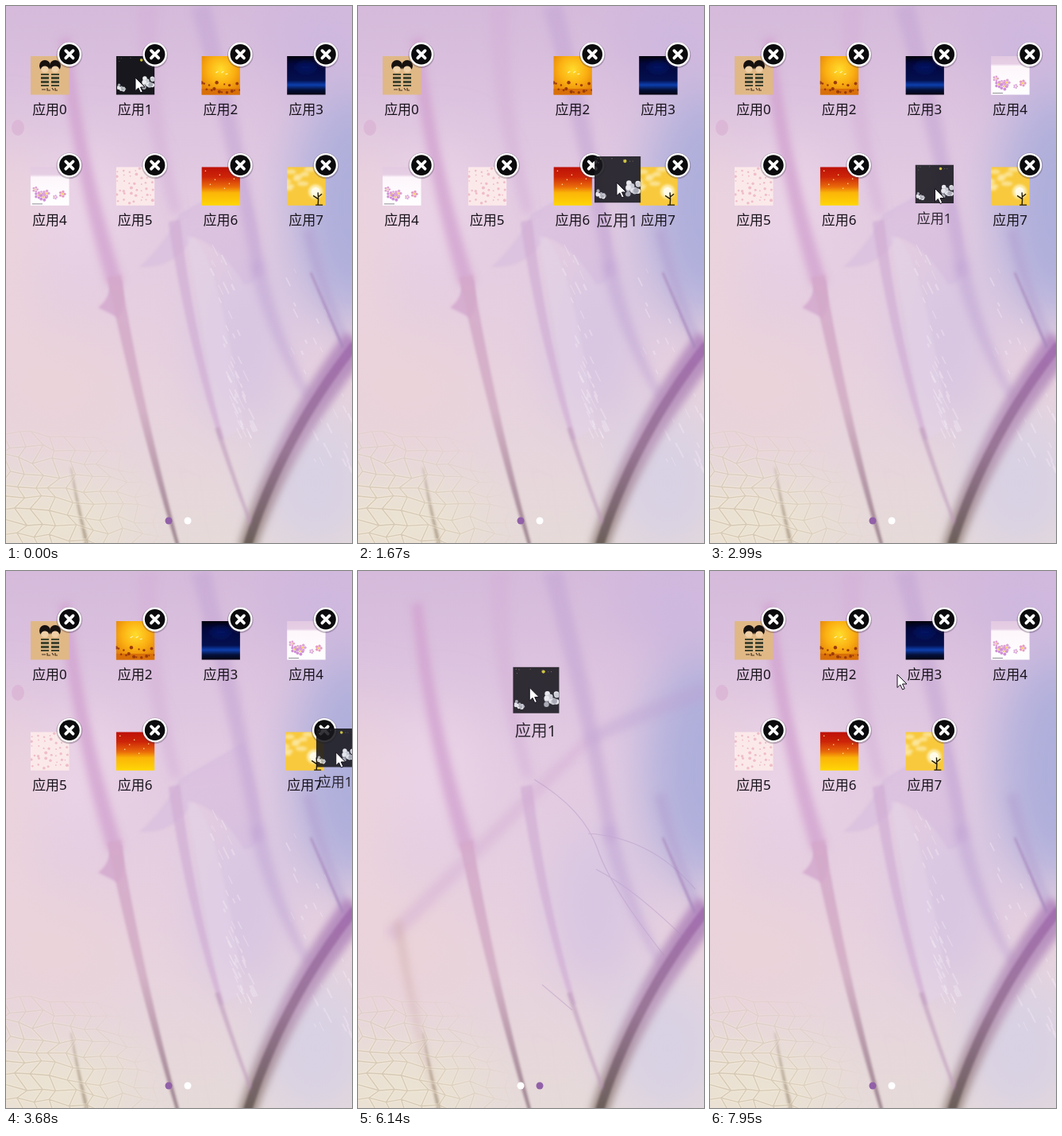
An HTML page that plays this animation: 436x675 px, repeating every 8000 ms.

```html
<!DOCTYPE html>
<html lang="zh">
<head>
<meta charset="utf-8">
<title>App grid</title>
<style>
html, body { margin: 0; width: 100%; height: 100%; overflow: hidden; background: #dcc6e0; }
svg { display: block; width: 100vw; height: 100vh; }
text { font: 17px "Noto Sans", "Noto Sans CJK SC", "Noto Sans CJK", sans-serif; text-anchor: middle; fill: #17121a; }
</style>
</head>
<body>
<svg viewBox="0 0 436 675">
  <defs>
    <filter id="wash" x="-100%" y="-100%" width="300%" height="300%"><feGaussianBlur stdDeviation="32"/></filter>
    <filter id="soft" x="-50%" y="-50%" width="200%" height="200%"><feGaussianBlur stdDeviation="5"/></filter>
    <filter id="edge" x="-50%" y="-50%" width="200%" height="200%"><feGaussianBlur stdDeviation="1.8"/></filter>
    <clipPath id="tile"><rect width="48.5" height="48.5"/></clipPath>
    <clipPath id="pane"><rect x="31" y="44" width="405" height="609"/></clipPath>
    <radialGradient id="fade" gradientUnits="userSpaceOnUse" cx="10" cy="700" r="200">
      <stop offset=".4" stop-color="#fff"/><stop offset="1" stop-color="#000"/>
    </radialGradient>
    <mask id="netMask"><rect width="436" height="675" fill="url(#fade)"/></mask>
    <radialGradient id="amber" cx=".5" cy=".35" r=".7">
      <stop offset="0" stop-color="#ffdc2c"/><stop offset=".5" stop-color="#fbb012"/><stop offset="1" stop-color="#e07a08"/>
    </radialGradient>
    <g id="ramps"></g>
  </defs>
  <g id="wall"></g>
  <g id="page"></g>
  <g id="dots"><circle cx="205" cy="647" r="4.5"/><circle cx="229" cy="647" r="4.5"/></g>
  <g id="top"></g>
  <path id="cursor" d="M0 0V16.5L3.8 13 6.6 19 9.2 17.8 6.5 12H12Z" fill="#fff" stroke="#15101c" stroke-linejoin="round"/>
</svg>
<script>
const $ = id => document.getElementById(id);
const W = 436, LOOP = 8000, STEP = 135.9;

let seed = 7;
const rnd = (a, b) => {
  seed = (seed * 16807) % 2147483647;
  return +(a + (b - a) * seed / 2147483647).toFixed(1);
};
const many = (n, f) => Array.from({ length: n }, (_, i) => f(i)).join('');
const blob = (x, y, rx, ry, fill, more = '') => `<ellipse cx="${x}" cy="${y}" rx="${rx}" ry="${ry}" fill="${fill}" ${more}/>`;
const disc = (x, y, r, fill, more) => blob(x, y, r, r, fill, more);
const box = (x, y, w, h, fill, more = '') => `<rect x="${x}" y="${y}" width="${w}" height="${h}" fill="${fill}" ${more}/>`;
const shape = (d, fill, more = '') => `<path d="${d}" fill="${fill}" ${more}/>`;
const line = (d, color, w = 1, more = '') => `<path d="${d}" fill="none" stroke="${color}" stroke-width="${w}" ${more}/>`;
const blur = (id, body) => `<g filter="url(#${id})">${body}</g>`;
const see = a => `opacity="${a}"`;

// Vertical ramps; a colour may carry its own stop
const ramp = (id, ...colors) => `<linearGradient id="${id}" x2="0" y2="1">` + colors.map((c, i) => {
  const [color, at = i / (colors.length - 1)] = c.split(' ');
  return `<stop offset="${at}" stop-color="${color}"/>`;
}).join('') + '</linearGradient>';
const ramps = ramp('sky', '#d5badb', '#e2cae2', '#e7d1df', '#e6dad9') +
  ramp('main', '#d5a9cb', '#d0abc2', '#8f7480') +
  ramp('stem', '#b184bd', '#bb9abb', '#938478') +
  ramp('core', '#a068ae', '#8f6b8c', '#5a5048') +
  ramp('dusk', '#02020c', '#030738', '#04104f .62', '#0d3fae .74', '#05113c .86', '#02030f') +
  ramp('blush', '#e3cae2', '#e6cfe5 .2', '#fdf6fb .26', '#fff') +
  ramp('flame', '#bd1008', '#cc2408', '#e8670a', '#fbb408 .66', '#ffd806');
$('ramps').outerHTML = ramps;

// Tapered stroke from a to b, bowed sideways
function vein([x0, y0], [x1, y1], bow, w0, w1, fill, more) {
  const len = Math.hypot(x1 - x0, y1 - y0), nx = (y0 - y1) / len, ny = (x1 - x0) / len;
  const side = sign => Array.from({ length: 17 }, (_, i) => {
    const u = i / 16, off = 2 * u * (1 - u) * bow + sign * (w0 + (w1 - w0) * u) / 2;
    return [x0 + (x1 - x0) * u + nx * off, y0 + (y1 - y0) * u + ny * off].map(n => n.toFixed(1));
  });
  return shape('M' + side(1).concat(side(-1).reverse()).join('L') + 'Z', fill, more);
}

// Irregular leaf mesh in the lower left corner
function mesh() {
  const node = (i, j) => [i * 21 - 8 + (j % 2) * 10 + rnd(-5, 5), 535 + j * 16 + i * 2 + rnd(-5, 5)];
  const rows = Array.from({ length: 10 }, (_, j) => Array.from({ length: 12 }, (_, i) => node(i, j)));
  const d = rows.map((row, j) => 'M' + row.join('L') + (j ? row.map((p, i) => `M${p}L${rows[j - 1][i]}`).join('') : '')).join('');
  return `<g mask="url(#netMask)">${line(d, '#f6ecd9', 4, see(.45))}${line(d, '#b5a78c', 1.3, see(.45))}</g>`;
}

const flecks = (n, x, y, slope, spread) => many(n, () => {
  const down = rnd(0, 250), l = rnd(4, 15);
  return line(`M${x + down * slope + rnd(-spread, spread)} ${y + down}l${l / 2} ${l}`, '#f1e6f2', rnd(.8, 2.6), see(.45));
});

const base = box(0, 0, W, 675, 'url(#sky)') + blur('wash',
  blob(435, 250, 75, 150, '#afafdb') + blob(400, 40, 80, 60, '#cfb8de') + blob(300, 420, 60, 110, '#d8c6e2') +
  blob(95, 250, 60, 80, '#ead3e6') + blob(0, 300, 22, 150, '#f0d8d8') + blob(60, 480, 90, 70, '#ead3d9') +
  blob(50, 650, 110, 50, '#ebe3d2') + blob(390, 600, 70, 90, '#d8d1e4'));

const patches = blob(15, 153, 8, 10, '#dab0d3', see(.7)) + blur('edge',
  shape('M168 328Q200 300 218 262L300 215Q340 350 300 350Q270 300 235 290Q215 330 168 328Z', '#ceb3dc', see(.35)) +
  shape('M228 290Q262 280 300 530L272 545Q250 420 228 290Z', '#e3d3e8', see(.5)) +
  shape('M116 379Q134 366 130 340L146 345Q152 380 142 392Z', '#d3a7cc', see(.8))) +
  flecks(55, 265, 300, .15, 12) + flecks(40, 370, 330, .2, 35);

const fineVeins = blur('soft',
  vein([40, 460], [290, 212], 0, 20, 14, '#d3aad2', see(.4)) +
  vein([290, 212], [440, 150], -6, 16, 24, '#bba0d0', see(.35)) +
  vein([50, 440], [103, 680], 8, 10, 3, '#d0b1b0', see(.6))) +
  line('M222 262Q285 300 302 350T395 495M290 330Q370 335 425 400M300 375Q350 400 420 470M232 520L270 552', '#b08fc0', 1.2, see(.4));

const veins = blur('soft',
  vein([178, 0], [215, 260], 19, 26, 14, '#d4b0d8', see(.5)) +
  vein([245, 0], [320, 340], -7, 24, 16, '#c5a6d4', see(.6)) +
  vein([315, 320], [385, 500], 15, 20, 8, '#c3a9d6', see(.6)) +
  vein([74, 40], [138, 350], 16, 14, 20, '#d3a3d0', see(.8)) +
  vein([380, 280], [436, 440], 9, 14, 8, '#b3a0d0', see(.6)) +
  vein([445, 420], [302, 685], 27, 40, 22, 'url(#stem)', see(.9))) +
  blur('edge',
  vein([136, 340], [217, 680], 8, 17, 4, 'url(#main)', see(.85)) +
  vein([212, 270], [272, 545], 12, 15, 6, '#cfa9d2', see(.6)) +
  vein([266, 530], [312, 660], 2, 6, 4, '#bf9dbb', see(.6)) +
  vein([384, 335], [425, 430], 0, 2, 3, '#a888bd') +
  vein([440, 425], [302, 685], 27, 12, 11, 'url(#core)', see(.8)) +
  vein([82, 580], [103, 680], 2, 1, 5, '#a08d78', see(.7))) + mesh();

$('wall').innerHTML = base + `<g id="flat">${patches}</g><g id="fine" clip-path="url(#pane)">${fineVeins}</g>` + veins;

const full = (fill, more) => box(0, 0, 49, 49, fill, more);
const doll = x => disc(x, 12, 7, '#17110f') + blob(x, 16.5, 5, 4, '#efcfa6') + box(x - 5, 22, 10, 16, '#41452f') +
  many(3, i => box(x - 5, 24 + i * 5, 10, 2, '#dcb78a'));
const flower = (x, y, r, color) => many(5, i => disc(x + r * Math.cos(i * 1.257), y + r * Math.sin(i * 1.257), r * .55, color)) + disc(x, y, r * .4, '#f4cf6a');
const puff = (x, y, r) => many(16, i => disc(x + rnd(-r, r) * .8, y + rnd(-r, r) * .8, r * .34, ['#a3a8b0', '#c9cdd3', '#eceef0'][i % 3]));

const art = [
  () => full('#e0b886') + doll(18) + doll(31) + line('M14 42h5m2-2v3h4m2-3l2 3m2-3v3h3', '#4a3424', 1.2),
  () => full('', 'id="night"') + puff(40, 34, 8) + puff(7, 40, 5) + disc(32, 5, 1.8, '#cfc42c') +
    many(7, () => disc(rnd(3, 44), rnd(2, 10), .5, '#6d6d50')),
  () => full('url(#amber)') + box(0, 41, 49, 8, '#d86f08') +
    many(16, i => disc(i * 3.2, rnd(33, 46), rnd(1, 2.4), '#9a3a08')) + line('M18 21l3-2m4 2l3-2m2 4l3-1', '#fff3b0', 1.2),
  () => full('url(#dusk)') + blur('soft', blob(24, 14, 14, 6, '#0a1a86', see(.6))),
  () => full('url(#blush)') + many(5, i => flower(6 + i * 3.4, rnd(24, 39), rnd(2, 3.6), i % 2 ? '#cf8fd6' : '#e0a3d4')) +
    flower(40, 34, 3, '#e59ac0') + flower(31, 38, 2, '#d7a3dd') + line('M2 46.5h13', '#75707a', .8),
  () => full('#fbe9ea') + many(42, i => disc((i % 7) * 7 + rnd(1, 5.5), (i / 7 | 0) * 8 + rnd(1, 6.5), rnd(.8, 2), '#ecabba', see(.7))),
  () => full('url(#flame)') + many(7, i => disc(5 + i * 6, 5 + i * 17 % 23, .8, '#ffdc9a')),
  () => full('#f8c93c') + blur('edge', many(9, i => blob(rnd(0, 32), 3 + i * 3, rnd(4, 9), 3, '#fce9a8', see(.75))) + disc(36, 31, 9, '#fdeeb0')) +
    disc(36, 31, 5.5, '#fffbe8') + line('M39 48Q40 41 39 32M39 40l-6-4m6 2l5-4M36 48h9', '#1e1706', 1.4)
];

const cross = '<g class="del" transform="translate(48.9 -2.2)">' + disc(0, .8, 16.4, '#4a3a52', see(.3)) +
  disc(0, 0, 15.2, '#fff') + disc(0, 0, 12.8, '#0b0a0c') +
  line('M-4.6 -4.6L4.6 4.6M4.6 -4.6L-4.6 4.6', '#fff', 3.8, 'stroke-linecap="round"') + '</g>';
const app = i => `<g id="app${i}"><g clip-path="url(#tile)">${art[i]()}</g>${cross}<text x="24" y="73">应用${i}</text></g>`;
const others = [0, 2, 3, 4, 5, 6, 7];
$('page').innerHTML = others.map(app).join('');
$('top').innerHTML = app(1);

// The picture moves in even steps with two rests
const runs = [[280, 38], [5600, 7], [6710, 10]];
function snap(now) {
  const run = runs.filter(([start]) => start <= now).pop();
  return run ? run[0] + STEP * Math.min(run[1] - 1, Math.floor((now - run[0]) / STEP)) : 0;
}

// time, x, y of the pointer
const path = [
  [280, 163, 90], [1635, 326, 222], [2290, 327, 224], [2315, 283, 226], [2800, 270, 229], [3410, 403, 234], [3675, 416, 228],
  [4100, 372, 224], [5170, 432, 228], [5320, 432, 228], [6410, 90, 99], [7115, 171, 240], [7400, 172, 160], [7930, 236, 130]
];
// Each grip: pick up, let go, offset from the pointer, scale, slot to fall into
const grips = [
  { from: 280, to: 2290, dx: 28, dy: 33, scale: 1.2, home: 6 },
  { from: 2800, to: 3750, dx: 25, dy: 30, scale: 1, home: 7 },
  { from: 4200, to: 6450, dx: 21, dy: 26, scale: 1.2, home: 0 }
];

const mix = (a, b, u) => a + (b - a) * u;
const glide = (t, start, span = 300) => (1 - Math.cos(Math.PI * Math.min(1, Math.max(0, (t - start) / span)))) / 2;
const slot = i => [31 + (i % 4) * 107.7, 63 + (i >> 2) * 139.3];

function pointer(t) {
  const n = path.findIndex(k => k[0] > t);
  if (n <= 0) return path[n ? path.length - 1 : 0].slice(1);
  const [t0, x0, y0] = path[n - 1], [t1, x1, y1] = path[n], u = (t - t0) / (t1 - t0);
  return [mix(x0, x1, u), mix(y0, y1, u)];
}

function carried(t) {
  const grip = grips.filter(g => g.from <= t).pop();
  if (!grip) return { x: slot(1)[0], y: slot(1)[1], scale: 1, lifted: false };
  const [px, py] = pointer(Math.min(t, grip.to)), [hx, hy] = slot(grip.home), fall = glide(t, grip.to);
  return { x: mix(px - grip.dx, hx, fall), y: mix(py - grip.dy, hy, fall), scale: mix(grip.scale, 1, fall), lifted: fall < 1 };
}

const place = (id, x, y, s = 1) => $(id).setAttribute('transform', `translate(${x.toFixed(2)} ${y.toFixed(2)}) scale(${s})`);
const show = (node, on) => { node.style.display = on ? '' : 'none'; };

function draw(t) {
  const back = glide(t, 7300, 600);
  const offset = t < 5300 ? 0 : W * (back - 1);
  const second = offset < -W / 2;

  for (const i of others) {
    const u = i && glide(t, i < 7 ? 1590 + i * 22 : 3652);
    const a = slot(i), b = slot(Math.max(0, i - 1));
    place('app' + i, mix(a[0], b[0], u), mix(a[1], b[1], u));
  }
  place('page', offset, 0);

  const { x, y, scale, lifted } = carried(t);
  place('app1', x + W * back, y, scale);
  $('app1').setAttribute('opacity', lifted ? .88 : 1);
  show($('app1').querySelector('.del'), !lifted);
  $('night').setAttribute('fill', t > 6700 ? '#000' : '#17171d');

  show($('flat'), !second);
  show($('fine'), second);
  [...$('dots').children].forEach((dot, i) => dot.setAttribute('fill', i === +second ? '#9160a8' : '#fff'));
  place('cursor', ...pointer(t));
}

let shown = -1;
const began = performance.now();
function frame() {
  const t = snap((performance.now() - began) % LOOP);
  if (t !== shown) draw(shown = t);
  requestAnimationFrame(frame);
}
frame();
</script>
</body>
</html>
```
